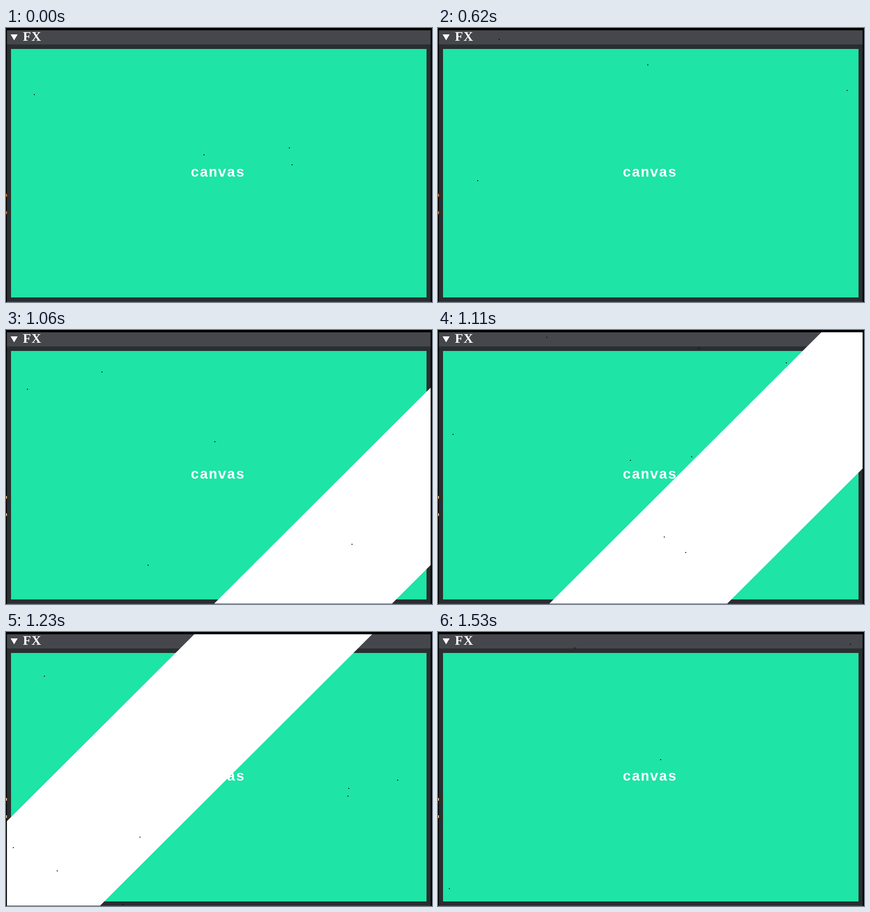
Write an HTML page with a canvas that moves like this. It is 932 by 601 pixels and loops after 1.63 s.

```html
<!DOCTYPE html>
<html lang="en">
<head>
<meta charset="utf-8">
<title>FX canvas</title>
<style>
  html, body { margin: 0; width: 100%; height: 100%; overflow: hidden; background: #000; }
  canvas { display: block; }
</style>
</head>
<body>
<canvas id="stage" width="932" height="601"></canvas>
<script>
const ctx = document.getElementById('stage').getContext('2d');
const LOOP = 1630;
const STEPS = 54;
const SHORT_STEPS = [8, 24, 36, 44, 48, 51];
const BAND_WIDTH = 389;

// Start time of every step: 30 ms each, a few last 20 ms.
const starts = [0];
for (let i = 1; i < STEPS; i++) {
  starts.push(starts[i - 1] + (SHORT_STEPS.includes(i - 1) ? 20 : 30));
}

function rect(color, x, y, w, h) {
  ctx.fillStyle = color;
  ctx.fillRect(x, y, w, h);
}

function polygon(color, points) {
  ctx.fillStyle = color;
  ctx.beginPath();
  for (const [x, y] of points) ctx.lineTo(x, y);
  ctx.fill();
}

function text(label, font, x, y, spacing) {
  ctx.font = font;
  ctx.letterSpacing = spacing;
  ctx.fillStyle = '#fff';
  ctx.fillText(label, x, y);
}

function random(seed) {
  let state = seed * 7919 + 17;
  return () => {
    state = (state * 1664525 + 1013904223) % 4294967296;
    return state / 4294967296;
  };
}

function drawWindow(time) {
  rect('#000', 0, 0, 932, 601);
  rect('#2a2e30', 2, 5, 927, 595);
  rect('#45474d', 2, 5, 927, 31);
  rect('#45474d', 2, 600, 927, 1);
  rect('#1ee4a5', 11, 46, 909, 545);
  const mark = time < 750 ? '#e87a1c' : '#f0b465';
  rect(mark, 0, 364, 2, 6);
  rect(mark, 0, 402, 2, 6);
  polygon('#fff', [[10, 14], [25.5, 14], [17.8, 27]]);
  text('FX', 'bold 29px "Liberation Serif", serif', 37, 28, '1px');
  text('canvas', 'bold 31px "Liberation Mono", monospace', 404, 326, '1.2px');
}

// Diagonal shine; each edge is a line x + y = constant.
function drawBand(step) {
  if (step < 33) return;
  const near = 632 - (step - 40) * (step < 40 ? 105.9 : 107.5);
  const far = near + BAND_WIDTH;
  ctx.save();
  ctx.beginPath();
  ctx.rect(2, 5, 927, 595);
  ctx.clip();
  polygon('#fff', [[near, 0], [far, 0], [far - 601, 601], [near - 601, 601]]);
  ctx.restore();
}

function drawSpecks(step) {
  const next = random(step + 1);
  next();
  const count = 4 + Math.floor(next() * 5);
  for (let i = 0; i < count; i++) {
    rect('#000', 12 + Math.floor(next() * 914), 10 + Math.floor(next() * 588), 2, 2);
  }
}

function draw() {
  const time = performance.now() % LOOP;
  const step = starts.filter(start => start <= time).length - 1;
  drawWindow(time);
  drawBand(step);
  drawSpecks(step);
  requestAnimationFrame(draw);
}
draw();
</script>
</body>
</html>
```
